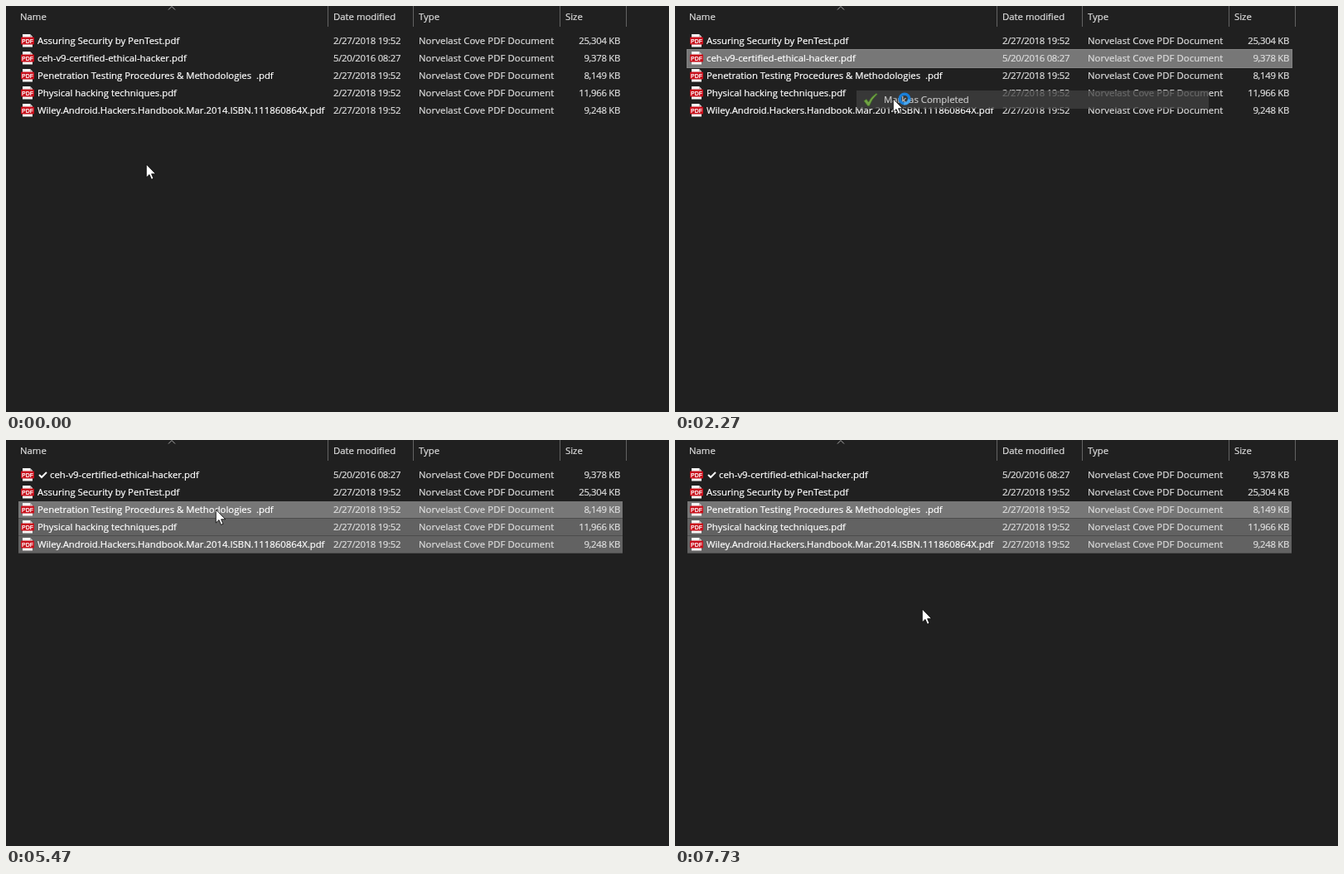
These frames come from a looping animation (800x490 px, 8 s). An HTML page:

```html
<!DOCTYPE html>
<html lang="en">
<head>
<meta charset="utf-8">
<title>Marking files as completed</title>
<style>
html, body { margin: 0; width: 100%; height: 100%; overflow: hidden; background: #202020; }
#stage {
  position: relative; width: 800px; height: 490px; overflow: hidden; background: #202020;
  font: 11.35px/21px "Open Sans", "Noto Sans", sans-serif; color: #fff; white-space: pre; cursor: default;
  -webkit-text-stroke: .22px;
}
#stage div, #stage span, #stage svg { position: absolute; }
#stage svg { overflow: visible; -webkit-text-stroke: 0; }
.anim { animation: 8s step-end -4ms infinite; }

/* header */
.head { top: 2px; color: #dedede; }
.line { top: 0; width: 1px; height: 25px; background: #636363; }

/* file rows */
.row { left: 0; width: 800px; height: 21px; }
.row svg { left: 18px; top: 3px; }
.row .tick { left: 39px; top: 6px; }
.name { left: 38px; }
.ticked { left: 53px; }
.date { left: 395px; color: #dedede; letter-spacing: -.3px; }
.type { left: 498px; color: #dedede; letter-spacing: .06px; }
.size { right: 59px; color: #dedede; letter-spacing: -.3px; }

/* row highlights */
.bar { left: 15px; width: 729px; height: 21px; opacity: 0; background: #626262; }
.split { height: 20px; border-bottom: 1px solid #4c4c4c; }
#hover { top: 0; background: #4d4d4d; animation-name: hover; }
#focus { left: 14px; top: 0; background: #777; border: 1px solid #484848; animation-name: focus; }
#bar2 { top: 74px; animation-name: bar2; }
#bar3 { top: 95px; animation-name: bar3; }
#bar4 { top: 116px; animation-name: bar4; }
#band {
  box-sizing: border-box; right: 538px; bottom: 332px; opacity: 0;
  border: 1px solid #0078d7; background: rgba(0, 120, 215, .35); animation-name: band;
}
#before { animation-name: before; }
#after { animation-name: after; }

/* context menus */
#stage .menu {
  box-sizing: border-box; height: 600px; padding: 4px 1px; opacity: 0;
  background: #2b2b2b; border: 1px solid #a0a0a0; box-shadow: 2px 2px 3px rgba(0, 0, 0, .5);
}
#menu1 { left: 217px; top: 53px; width: 429px; animation-name: menu1; }
#menu2 { left: 254px; top: 84px; width: 308px; animation-name: menu2; }
#stage .menu .item { position: relative; }
.item { height: 22px; }
.item span { left: 33px; }
.item svg { left: 9px; top: 3px; }
#stage .item .more { left: auto; right: 9px; top: 5px; }
#stage .menu .sep { position: relative; height: 1px; margin: 3px 9px; background: #808080; }
.ghost { background: #414141; opacity: 0; }
#ghost1 { left: 219px; top: 102px; width: 425px; animation-name: ghost1; }
#ghost2 { left: 256px; top: 111px; width: 304px; animation-name: ghost2; }

/* pointer */
#pointer { left: 0; top: 0; animation-name: pointer; }
#busy { left: 6px; top: -8px; animation-name: busy; }
#spin { transform-origin: 8px 8px; animation: spin 1s linear infinite; }

@keyframes spin { to { transform: rotate(360deg); } }
@keyframes pointer {
  0%      { transform: translate(169px, 191px); }
  1.667%  { transform: translate(169px, 191px); animation-timing-function: steps(2); }
  3.333%  { transform: translate(176px, 166px); animation-timing-function: steps(3); }
  5.833%  { transform: translate(203px, 84px); animation-timing-function: steps(3); }
  8.333%  { transform: translate(217px, 62px); }
  15.833% { transform: translate(217px, 62px); animation-timing-function: steps(2); }
  17.5%   { transform: translate(207px, 74px); animation-timing-function: steps(3); }
  20%     { transform: translate(248px, 103px); animation-timing-function: steps(3); }
  22.5%   { transform: translate(263px, 112px); }
  29.167% { transform: translate(263px, 112px); animation-timing-function: steps(4); }
  32.5%   { transform: translate(275px, 160px); animation-timing-function: steps(3); }
  35%     { transform: translate(281px, 190px); }
  51.667% { transform: translate(281px, 190px); animation-timing-function: steps(4); }
  55%     { transform: translate(262px, 158px); }
  60%     { transform: translate(261px, 147px); animation-timing-function: steps(3); }
  62.5%   { transform: translate(258px, 118px); animation-timing-function: steps(5); }
  66.667% { transform: translate(253px, 84px); }
  76.667% { transform: translate(253px, 84px); animation-timing-function: steps(3); }
  79.167% { transform: translate(264px, 104px); animation-timing-function: steps(3); }
  81.667% { transform: translate(274px, 118px); }
  90%     { transform: translate(274px, 118px); animation-timing-function: steps(4); }
  93.333% { transform: translate(290px, 175px); animation-timing-function: steps(4); }
  96.667%, 100% { transform: translate(298px, 204px); }
}
@keyframes busy {
  0% { opacity: 0; }
  28.333% { opacity: 1; }
  33.333% { opacity: 0; }
  88.333% { opacity: 1; }
  95%, 100% { opacity: 0; }
}
@keyframes hover {
  0% { opacity: 0; }
  5% { opacity: 1; transform: translateY(95px); }
  5.833% { opacity: 1; transform: translateY(74px); }
  7.5% { opacity: 1; transform: translateY(53px); }
  12.5%, 100% { opacity: 0; }
}
@keyframes focus {
  0% { opacity: 0; transform: translateY(52px); }
  12.5% { opacity: 1; transform: translateY(52px); border-color: #484848; }
  28.333% { opacity: 1; transform: translateY(52px); border-color: #848484; }
  45% { opacity: 1; transform: translateY(31px); border-color: #848484; }
  60.833%, 100% { opacity: 0; transform: translateY(31px); }
}
@keyframes before { 0% { opacity: 1; } 45%, 100% { opacity: 0; } }
@keyframes after { 0% { opacity: 0; } 45%, 100% { opacity: 1; } }
@keyframes bar2 {
  0% { opacity: 0; background: #626262; }
  65.833% { opacity: 1; background: #626262; }
  68.333%, 100% { opacity: 1; background: #777; }
}
@keyframes bar3 { 0% { opacity: 0; } 63.333%, 100% { opacity: 1; } }
@keyframes bar4 {
  0% { opacity: 0; background: #626262; }
  61.667% { opacity: 1; background: #626262; }
  89.167% { opacity: 1; background: #777; }
  91.667%, 100% { opacity: 1; background: #626262; }
}
@keyframes band {
  0% { opacity: 0; left: 261px; top: 147px; }
  60% { opacity: 0; left: 261px; top: 147px; animation-timing-function: steps(1); }
  60.833% { opacity: 1; left: 260px; top: 137px; animation-timing-function: steps(2); }
  62.5% { opacity: 1; left: 258px; top: 118px; animation-timing-function: steps(5); }
  66.667% { opacity: 1; left: 253px; top: 84px; }
  68.333%, 100% { opacity: 0; left: 253px; top: 84px; }
}
@keyframes menu1 {
  0% { opacity: 0; }
  15.833% { opacity: .35; }
  16.667% { opacity: .7; }
  17.5% { opacity: 1; }
  28.333%, 100% { opacity: 0; }
}
@keyframes menu2 {
  0% { opacity: 0; }
  73.333% { opacity: .35; }
  74.167% { opacity: .7; }
  75% { opacity: 1; }
  88.333%, 100% { opacity: 0; }
}
@keyframes call { 0% { background: none; } 18.333% { background: #414141; } 20.833%, 100% { background: none; } }
@keyframes mark1 { 0% { background: none; } 20.833%, 100% { background: #414141; } }
@keyframes open2 { 0% { background: none; } 77.5% { background: #414141; } 80.833%, 100% { background: none; } }
@keyframes mark2 { 0% { background: none; } 80.833%, 100% { background: #414141; } }
@keyframes ghost1 {
  0% { opacity: 0; }
  28.333% { opacity: .75; animation-timing-function: steps(4); }
  31.667%, 100% { opacity: 0; }
}
@keyframes ghost2 {
  0% { opacity: 0; }
  88.333% { opacity: .75; animation-timing-function: steps(4); }
  91.667%, 100% { opacity: 0; }
}
</style>
</head>
<body>
<div id="stage"></div>
<script>
const svg = (body, cls = '', size = 16) =>
  `<svg class="${cls}" width="${size}" height="${size}" viewBox="0 0 ${size} ${size}">${body}</svg>`;
const square = color => svg(`<rect x=".5" y=".5" width="15" height="15" fill="${color}"/>`);
const disc = color => svg(`<circle cx="8" cy="8" r="7" fill="${color}"/>`);

const pdf = svg(`<path d="M2 0H11L14 3V15.500H2Z" fill="#f4f4f4"/><path d="M11 0V3H14" fill="#bbb"/>
  <rect y="3.500" width="16" height="9" rx="1" fill="#c8101c"/>
  <text x="8" y="10.500" text-anchor="middle" fill="#fff" font-family="Liberation Sans, sans-serif"
    font-size="7" font-weight="700">PDF</text>`);
const tick = svg('<path d="M1 5L4 8L10 2" fill="none" stroke="#fff" stroke-width="2"/>', 'tick', 11);
const check = svg(`<path d="M0 9.500L3 7.500L5.500 11Q9 4 15 .5L16 1.500Q9.500 7 6.500 15.500H4.500Z"
  fill="#8ccc52" stroke="#4c8f26" stroke-width=".7"/>`);
const share = svg(`<path d="M5 4H1V14.500H12V11M4 10.500Q5 5.500 10 5.500V2.500L15 6.500L10 10.500V8Q6.500 7.500 4 10.500Z"
  fill="none" stroke="#fff" stroke-width="1.200"/>`);
const archive = square('#a0388c');
const more = svg('<path d="M1 0.500L7 6L1 11.500" fill="none" stroke="#e6dcb4" stroke-width="1.200"/>', 'more', 8);

const type = 'Norvelast Cove PDF Document';
const row = (i, name, size, date = '2/27/2018 19:52', done = false) =>
  `<div class="row" style="top:${31 + 21 * i}px">${pdf}${done ? tick : ''}` +
  `<span class="name ${done ? 'ticked' : ''}">${name}</span><span class="date">${date}</span>` +
  `<span class="type">${type}</span><span class="size">${size} KB</span></div>`;
const ceh = 'ceh-v9-certified-ethical-hacker';
const assuring = i => row(i, 'Assuring Security by PenTest.pdf', '25,304');
const hacker = (i, done) => row(i, ceh + '.pdf', '9,378', '5/20/2016 08:27', done);

const item = (text, icon = '', motion = '') =>
  `<div class="item ${motion && 'anim'}" style="animation-name:${motion || 'none'}">${icon}<span>${text}</span></div>`;
const sep = '<div class="sep"></div>';
const tools = [
  item('Edit with KVole', square('#080c0a')),
  item('Edit with Tillerix TEAL', square('#0c2a5c')),
  item('Open with Code', square('#1f8ad2')),
  item('Move to TwoShelf', disc('#1490df')),
  item('Scan with Norvelast Guardian...', square('#0a78d4')),
  item('Share', share)
].join('');
const tail = name => [
  item('Add to archive...', archive),
  item(`Add to "${name}.rar"`, archive),
  item('Create solid archive...', archive),
  item('Compress and email...', archive),
  item(`Compress to "${name}.rar" and email`, archive),
  item('Restore previous versions'), sep,
  item('Send to', more), sep,
  item('Cut'), item('Copy'), sep, item('Create shortcut')
].join('');
const mark = motion => item('Mark as Completed', check, motion);
const ghost = n =>
  `<div id="ghost${n}" class="item ghost anim">${check}<span>Mark as Completed</span></div>`;
const bar = (id, cls = '') => `<div id="${id}" class="bar anim ${cls}"></div>`;

const heads = [[17, 'Name'], [395, 'Date modified'], [498, 'Type'], [675, 'Size']];
document.getElementById('stage').innerHTML =
  heads.map(([x, text]) => `<span class="head" style="left:${x}px">${text}</span>`).join('') +
  [388, 491, 668, 748].map(x => `<div class="line" style="left:${x}px"></div>`).join('') +
  '<svg width="8" height="5" style="left:196px;top:0"><path d="M0 4.500L4 .5L8 4.500" fill="none" stroke="#aaa"/></svg>' +
  bar('hover') + bar('focus') + bar('bar2', 'split') + bar('bar3', 'split') + bar('bar4', 'split') +
  `<div id="before" class="anim">${assuring(0)}${hacker(1, false)}</div>` +
  `<div id="after" class="anim">${hacker(0, true)}${assuring(1)}</div>` +
  row(2, 'Penetration Testing Procedures &amp; Methodologies  .pdf', '8,149') +
  row(3, 'Physical hacking techniques.pdf', '11,966') +
  row(4, 'Wiley.Android.Hackers.Handbook.Mar.2014.ISBN.111860864X.pdf', '9,248') +
  '<div id="band" class="anim"></div>' +
  `<div id="menu1" class="menu anim">${item('<b>Open</b>')}${item('Share with Zulpe', disc('#1ba4e6'), 'call')}` +
  `${mark('mark1')}${tools}${item('Open with', more)}${tail(ceh)}</div>` +
  `<div id="menu2" class="menu anim">${item('<b>Open</b>', '', 'open2')}${mark('mark2')}${tools}${tail('Reading')}</div>` +
  ghost(1) + ghost(2) +
  `<div id="pointer" class="anim"><svg width="12" height="19">
    <path d="M.3 0V16L4 12.500L6.500 18.300L9 17.300L6.600 11.700H11.700Z" fill="#fff" stroke="#000" stroke-width=".8"/></svg>
    <svg id="busy" class="anim" width="16" height="16"><g fill="none" stroke-width="3.600">
    <circle cx="8" cy="8" r="5.700" stroke="#1a7fd8"/>
    <path id="spin" d="M8 2.300A5.700 5.700 0 0 1 13.700 8" stroke="#4aa8f0"/></g></svg></div>`;
</script>
</body>
</html>
```
